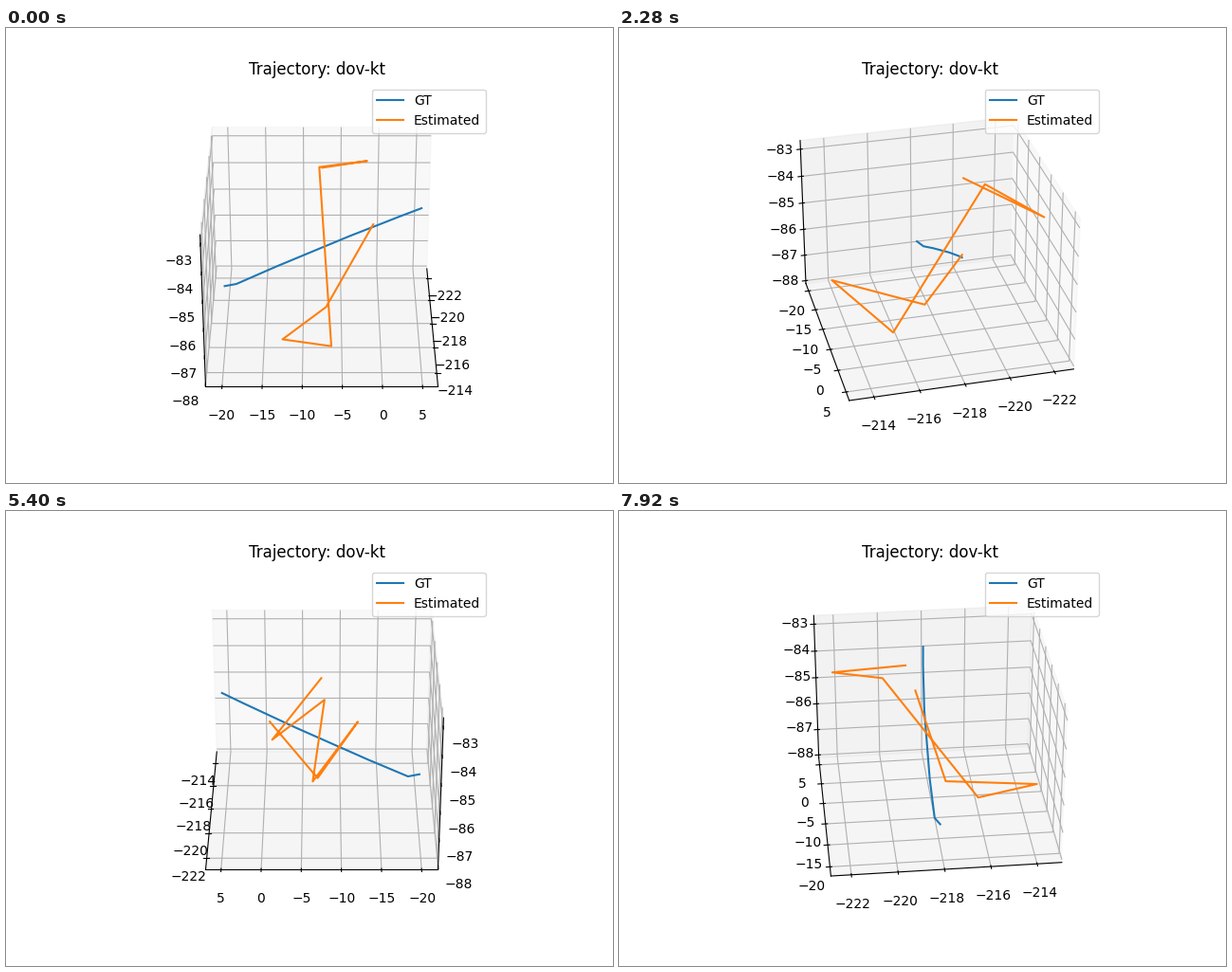
A matplotlib script that plays this animation: 640 px wide and 480 px high, repeating every 8 s.

```python
import numpy as np
import matplotlib.pyplot as plt
from matplotlib.animation import FuncAnimation

TICK_MS = 40        # timer step
TICKS = 200         # one loop is 8 s
TICKS_PER_STEP = 3  # the view turns every 120 ms
DEG_PER_STEP = 4


def true_path():
    """A slow climb along a shallow arc, after a short level hook."""
    y = np.array([-20.2, -18.7, -13.5, -4.15, 2.4, 5.08])
    run = y - y[1]
    x = -218.336 + 0.00103 * (y - y[2])**2 + 0.11 * np.maximum(-run, 0)
    z = -86.73 + 0.1237 * np.maximum(run, 0)
    return x, y, z


def estimated_path():
    """A zigzag through a few key points."""
    return np.transpose([
        (-218.54, -0.96, -84.60),
        (-217.39, -7.01, -87.20),
        (-213.56, -12.44, -86.66),
        (-215.88, -6.34, -88.00),
        (-220.18, -7.89, -83.15),
        (-222.24, -1.56, -83.70),
        (-219.17, -7.49, -82.79),
    ])


def limits(values, margin):
    """Data range widened by a margin, then by 1/48 of itself per side."""
    lo, hi = values.min(), values.max()
    pad = (hi - lo) * (margin + (1 + 2 * margin) / 48)
    return lo - pad, hi + pad


paths = {"GT": true_path(), "Estimated": estimated_path()}
x, y, z = np.hstack(list(paths.values()))

fig = plt.figure(figsize=(6.4, 4.8), dpi=100)
ax = fig.add_subplot(projection="3d")
for name, path in paths.items():
    ax.plot(*path, label=name)
ax.set(xlim=limits(x, 0.05), ylim=limits(y, 0.05), zlim=limits(z, 0))
ax.set_title("Trajectory: dov-kt")
ax.legend(loc="upper right")


def turn(tick):
    ax.view_init(elev=30, azim=tick // TICKS_PER_STEP * DEG_PER_STEP)
    return ax.lines


anim = FuncAnimation(fig, turn, frames=TICKS, interval=TICK_MS,
                     repeat=True, repeat_delay=0, blit=False)
plt.show()
```
